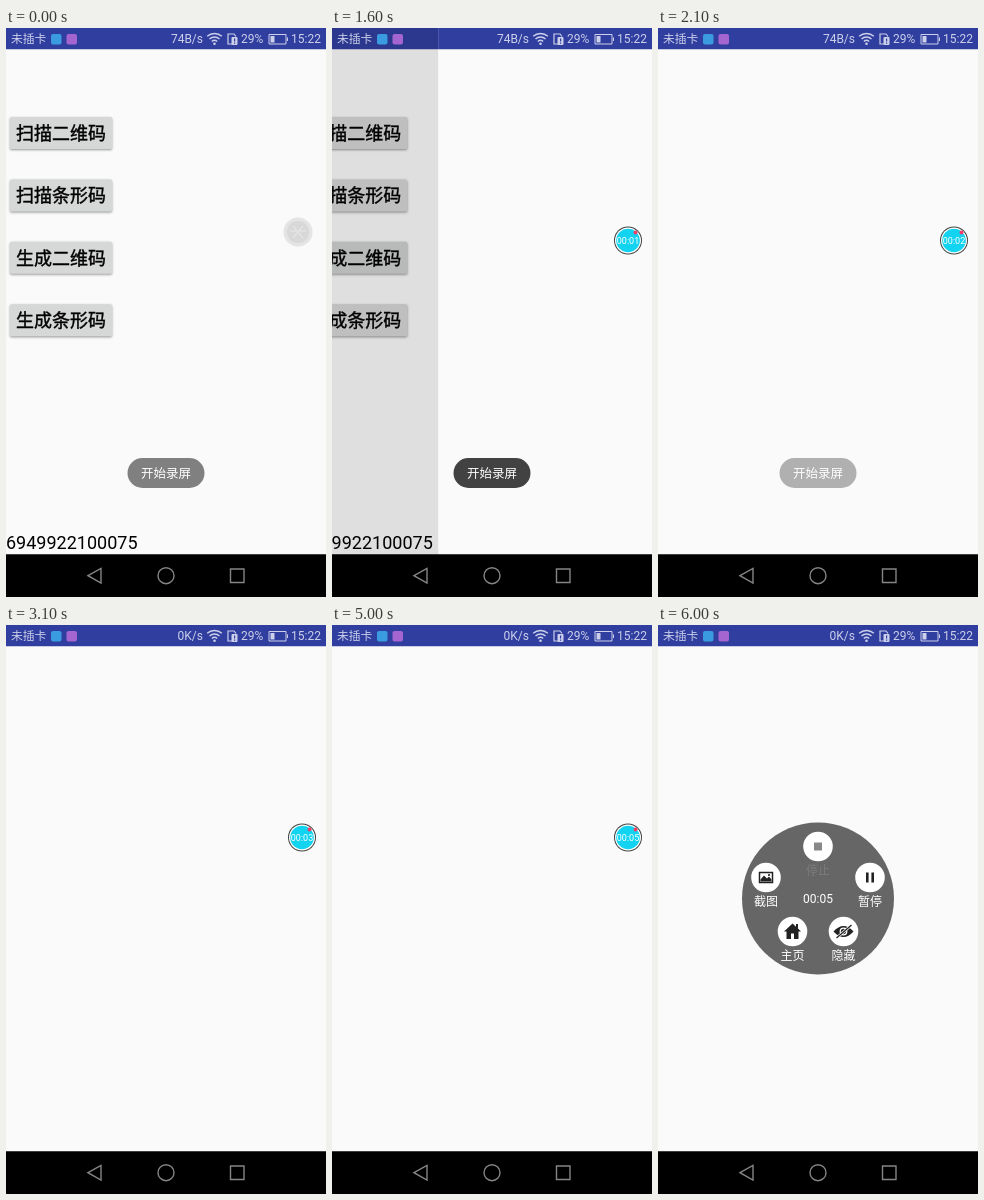
Animation, 320 px wide and 569 px high, one loop 6.1 s. Source, as an HTML page with a canvas:

```html
<!DOCTYPE html>
<html lang="zh-CN">
<head>
<meta charset="utf-8">
<title>录屏</title>
<style>
html, body { margin: 0; width: 100%; height: 100%; overflow: hidden; background: #fafafa }
canvas { display: block; width: 320px; height: 569px }
</style>
</head>
<body>
<canvas></canvas>
<script>
const W = 320, H = 569, LOOP = 6100, STEP = 100;
const BAR = 21.33, NAV = 526.3; // bottom of the status bar, top of the navigation bar
const canvas = document.querySelector('canvas');
const c = canvas.getContext('2d');
const dpr = window.devicePixelRatio || 1;
canvas.width = W * dpr;
canvas.height = H * dpr;

const clamp = x => Math.max(0, Math.min(1, x));
const mix = (a, b, p) => a + (b - a) * p;

// y is the optical middle of the line
function text(s, x, y, size, color, align = 'left', extra = 0) {
  c.font = `${size}px Roboto, "Noto Sans CJK SC", "Noto Sans CJK", sans-serif`;
  c.textAlign = align;
  c.fillStyle = c.strokeStyle = color;
  c.fillText(s, x, y + size * 0.36);
  if (extra) {
    c.lineWidth = extra;
    c.strokeText(s, x, y + size * 0.36);
  }
}
function rect(x, y, w, h, color, r = 0) {
  c.beginPath();
  c.roundRect(x, y, w, h, r);
  c.fillStyle = color;
  c.fill();
}
function disc(x, y, r, color) {
  c.beginPath();
  c.arc(x, y, r, 0, 7);
  c.fillStyle = color;
  c.fill();
}
function line(d, color, width) {
  c.strokeStyle = color;
  c.lineWidth = width;
  c.stroke(new Path2D(d));
}
function shape(d, color) {
  c.fillStyle = color;
  c.fill(new Path2D(d), 'evenodd');
}
function group(alpha, draw) {
  c.save();
  c.globalAlpha *= alpha;
  draw();
  c.restore();
}

function pageBack() {
  rect(0, 0, W, H, '#fafafa');
  rect(0, 0, W, BAR, '#303f9f');
}

function home(t) {
  pageBack();
  ['扫描二维码', '扫描条形码', '生成二维码', '生成条形码'].forEach((label, i) => {
    const y = 89 + i * 62.4;
    c.save();
    c.shadowColor = 'rgba(0,0,0,.4)';
    c.shadowBlur = 2.5 * dpr;
    c.shadowOffsetY = dpr;
    rect(4, y, 102, 32, '#d6d7d7', 1.5);
    c.restore();
    if (i === 2 && t >= 1200) rect(4, y, 102, 32, 'rgba(0,0,0,.03)', 1.5);
    text(label, 55, y + 16.5, 18, '#000', 'center', 0.4);
  });
  text('6949922100075', 0, 515, 18, '#000');
}

function status(t) {
  const ink = '#ccd0ea';
  text('未插卡', 5, 11, 11.8, ink);
  rect(45, 6, 10.5, 10.5, '#3b9be0', 2);
  rect(60.5, 6, 10.5, 10.5, '#a565d0', 2);
  text(t < 2600 ? '74B/s' : '0K/s', 197, 11, 12, ink, 'right');
  for (const r of [4, 7.5, 11]) {
    c.beginPath();
    c.arc(208.5, 16.5, r, -2.3, -0.84);
    c.strokeStyle = ink;
    c.lineWidth = 1.4;
    c.stroke();
  }
  disc(208.5, 15.8, 1.3, ink);
  line('M226 16H222V6H228L230 8.5', ink, 1.2);
  rect(225.5, 9, 6, 8, ink, 1);
  rect(228, 10.5, 1.2, 3, '#303f9f');
  rect(228, 14.5, 1.2, 1.2, '#303f9f');
  text('29%', 235, 11, 12, ink);
  line('M263 6.5H280V16H263ZM281.5 9.5V13', ink, 1);
  rect(264.5, 8, 4, 6.5, ink);
  text('15:22', 315, 11, 12, ink, 'right');
}

function nav() {
  rect(0, NAV, W, H - NAV, '#000');
  line('M82 547.7L95 540.5V555ZM168 547.7A8 8 0 1 1 152 547.7A8 8 0 1 1 168 547.7M224.5 541H238V554.5H224.5Z',
    '#858585', 1.4);
}

function toast(alpha) {
  group(alpha, () => rect(121.5, 430, 77, 30, '#424242', 15));
  text('开始录屏', 160, 445, 12.5, '#fff', 'center');
}

function bubble(seconds) {
  disc(296, 212.5, 14, '#444');
  disc(296, 212.5, 13, '#fff');
  disc(296, 212.5, 11.8, '#12d3f0');
  disc(303.5, 204.5, 2, '#f0406a');
  text('00:0' + seconds, 296, 212.5, 9, '#fff', 'center');
}

function ghost() {
  group(0.8, () => {
    disc(292, 204, 14.5, '#dedede');
    disc(292, 204, 11, '#d4d4d4');
    line('M284 203H300M287 198L297 210M297 198L287 210', '#e6e6e6', 1.5);
  });
}

// icons are drawn around their own centre
const icons = {
  stop: pressed => rect(-4, -4, 8, 8, pressed ? '#888' : '#333'),
  pause() { rect(-4, -5, 2.6, 10, '#222'); rect(1.4, -5, 2.6, 10, '#222'); },
  shot() {
    line('M-6.5 -5H6.5V5H-6.5Z', '#222', 1.5);
    shape('M-5.5 4V2L-2 -2L1 1L3 -1L5.5 2V4Z', '#222');
    disc(3, -2.5, 1.1, '#222');
  },
  home: () => shape('M0 -8L3.5 -4.8V-7.5H5.5V-3L8.5 0H6V7.5H1.5V2H-1.5V7.5H-6V0H-8.5Z', '#222'),
  hide() {
    shape('M-10 0Q0 -11 10 0Q0 11 -10 0Z', '#222');
    c.beginPath();
    c.arc(0, 0, 3.3, 0, 7);
    c.strokeStyle = '#fff';
    c.lineWidth = 1.2;
    c.stroke();
    line('M-7 6.5L8 -6.5', '#fff', 2.8);
    line('M-7 6.5L8 -6.5', '#222', 1.3);
  }
};
const items = [
  ['stop', '停止', 0, -52], ['pause', '暂停', 52, -21], ['shot', '截图', -52, -21],
  ['home', '主页', -25.5, 33], ['hide', '隐藏', 25.5, 33]
];

function menu(p, pressed) {
  const scale = mix(14, 76, p) / 76;
  c.save();
  c.translate(mix(296, 160, p), mix(212.5, 273.5, p));
  c.scale(scale, scale);
  disc(0, 0, 76, `rgba(40,40,40,${mix(0.3, 0.7, p)})`);
  for (const [name, label, x, y] of items) {
    const down = pressed && name === 'stop';
    disc(x, y, 14.8, '#fff');
    c.save();
    c.translate(x, y);
    icons[name](down);
    c.restore();
    group(down ? 0.15 : mix(0.3, 1, p), () => text(label, x, y + 24.5, 12, '#fff', 'center'));
  }
  text('00:05', 0, 0.5, 12, '#fff', 'center');
  c.restore();
}

function draw(t) {
  c.setTransform(dpr, 0, 0, dpr, 0, 0);
  const slide = 1 - (1 - clamp((t - 1400) / 500)) ** 2.16;
  if (slide < 1) {
    c.save();
    c.translate(-46 * slide, 0);
    home(t);
    c.restore();
    rect(0, 0, W, H, `rgba(0,0,0,${0.165 * slide})`);
  }
  if (slide > 0) {
    c.save();
    c.translate(W * (1 - slide), 0);
    pageBack();
    c.restore();
  }
  status(t);
  nav();

  if (t < 2200) {
    const shown = t < 100 ? 0.66 : t < 200 ? 0.88 : 1;
    toast(Math.min(shown, 1 - clamp((t - 1900) / 300) * 0.9));
  }
  if (t < 100) ghost();
  else if (t < 5100) {
    const seconds = [1100, 2100, 3100, 4100, 5000].filter(s => t >= s).length;
    group(t < 200 ? 0.7 : 1, () => bubble(seconds));
  } else menu(clamp((t - 5000) / 385), t >= 6000);
}

const start = performance.now();
function tick() {
  const t = (performance.now() - start) % LOOP;
  draw(Math.floor(t / STEP) * STEP);
  requestAnimationFrame(tick);
}
tick();
</script>
</body>
</html>
```
